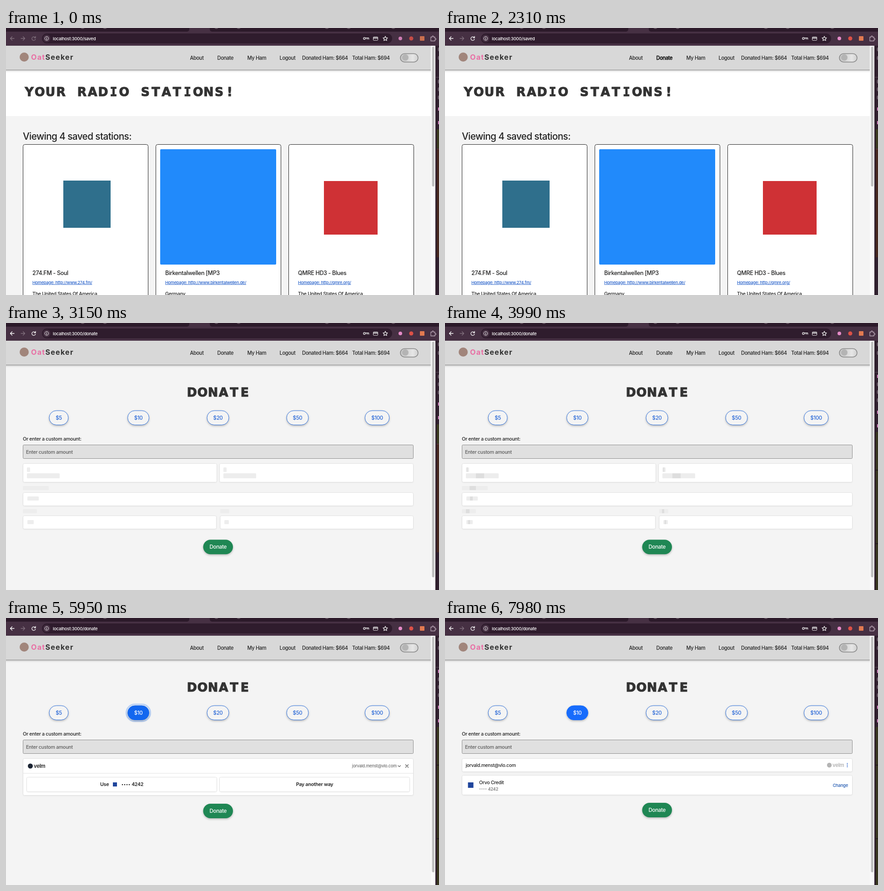
Write an HTML page that moves like this. It is 952x588 px and loops after 8 s.

```html
<!DOCTYPE html>
<html lang="en">
<head>
<meta charset="utf-8">
<title>Donate flow</title>
<style>
  html, body { margin: 0; width: 100%; height: 100%; overflow: hidden; background: #f4f4f4 }
  svg { display: block; width: 952px; height: 588px }
  text { font-family: Inter, Roboto, sans-serif; font-weight: 450; letter-spacing: -.03em; fill: #222; white-space: pre }
  .heading { font: 700 26.5px "DejaVu Sans", sans-serif; text-anchor: middle; fill: #333; stroke: #333; stroke-width: 1.2; letter-spacing: 0 }
  .slab { font-family: "DejaVu Sans Mono", monospace }
  .brand { font-weight: 700; letter-spacing: 1.2px; fill: #333 }
  .mid { text-anchor: middle }
  .end { text-anchor: end }
  .line { fill: none; stroke-width: 1.3; stroke-linecap: round; stroke-linejoin: round }
  .lift { filter: drop-shadow(0 2px 2px rgba(0, 0, 0, .25)) }
  .soft { filter: drop-shadow(0 1px 1px rgba(0, 0, 0, .06)) }
</style>
</head>
<body>
<svg id="stage" viewBox="0 0 952 588"></svg>
<script>
const text = (x, y, size, str, attrs = '') => `<text x="${x}" y="${y}" font-size="${size}" ${attrs}>${str}</text>`;
const rect = (x, y, w, h, fill, rx = 0, attrs = '') =>
  `<rect x="${x}" y="${y}" width="${w}" height="${h}" fill="${fill}" rx="${rx}" ${attrs}/>`;
const dot = (x, y, r, fill, attrs = '') => `<circle cx="${x}" cy="${y}" r="${r}" fill="${fill}" ${attrs}/>`;
const line = (d, color, attrs = '') => `<path class="line" d="${d}" stroke="${color}" ${attrs}/>`;
const group = (id, ...parts) => `<g id="${id}">${parts.join('')}</g>`;
const each = (list, fn) => list.map(fn).join('');
const bold = 'style="font-weight:600"', medium = 'style="font-weight:500"';

// Monospaced wide heading: one fixed pitch per letter, slab-serif I
const heading = (x, y, str) =>
  `<text class="heading" x="${[...str].map((_, i) => (x + i * 23.2).toFixed(1)).join(' ')}" y="${y}">` +
  str.replace(/I/g, '<tspan class="slab">I</tspan>') + '</text>';

const toolbar = () => rect(0, 0, 952, 39, '#463043') +
  rect(-8, -8, 411, 16, '#2c1a2a', 5) + rect(448, -8, 520, 16, '#2c1a2a', 5) +
  each([168, 217, 462, 511, 705, 753, 851], x => line(`M${x - 3} 0l2 1h3l2 -1`, '#85757f', 'opacity=".8"')) +
  line('M18 23H9.500m4 -4l-4 4l4 4', '#fff', 'id="back"') +
  line('M33 23h8.500m-4 -4l4 4l-4 4', '#81707d') +
  line('M64.500 21.500a4 4 0 1 0 .3 2.800M65 18.500v3.200h-3.200', '#fff', 'id="reload"') +
  rect(79, 12, 770, 22, '#2f1c2d', 11) + dot(89.5, 23, 8, '#463043') +
  dot(89.5, 23, 4.2, 'none', 'stroke="#eee"') + line('M89.500 22.800v2.300M89.500 20.800v.1', '#eee') +
  text(103, 27, 9.6, '', 'id="url" style="fill:#fff"') +
  dot(788, 23, 2.2, 'none', 'stroke="#eee" stroke-width="1.300"') + line('M790.500 22h7v3M794 22v3', '#eee') +
  rect(807.5, 19.5, 10, 7.5, 'none', 1, 'stroke="#eee"') + rect(807.5, 21, 10, 2, '#eee') +
  line('M834 18.200l1.500 3.200l3.500 .4l-2.600 2.400l.7 3.500l-3.100 -1.800l-3.100 1.800l.7 -3.500l-2.600 -2.400l3.500 -.4z', '#eee', 'stroke-width="1.100"') +
  group('extensions', dot(867, 23, 4, '#e58bc8'), dot(891, 23, 4.5, '#dd5147'), rect(910, 18, 10, 10, '#e27a50', 1)) +
  line('M934 20h3v-1a1.500 1.500 0 0 1 3 0v1h3v3h1a1.500 1.500 0 0 1 0 3h-1v2.500h-9z', '#b9a6b5');

const sidebar = (id, marks, pinks, bands) => group(id, rect(944, 39, 8, 549, '#30202e'),
  each(bands, ([y, h, c]) => rect(947, y, 5, h, c)),
  rect(945, 108, 7, 1, '#5a4856'),
  each(marks, y => rect(950.5, y - 3.5, 6, 7, 'none', 1, 'stroke="#a99aa6"')),
  each(pinks, y => rect(950, y - 3, 2, 7, '#d884c4')));

const navbar = () => rect(0, 93, 934, 5, 'url(#shade)') + rect(0, 39, 934, 54, '#d8d8d8') + rect(0, 92, 934, 1, '#858585') +
  dot(40, 64, 10, '#a1857b') +
  text(55, 69.5, 16.2, '<tspan fill="#e870a4">Oat</tspan>Seeker', 'class="brand"') +
  each([[404.5, 'About'], [464.5, 'Donate', 'id="navDonate"'], [530.5, 'My Ham'], [601.5, 'Logout'],
    [651, 'Donated Ham: $664'], [761, 'Total Ham: $694']], ([x, s, a]) => text(x, 69.7, 11.05, s, a)) +
  rect(867, 56.5, 39, 18.5, 'url(#toggle)', 9.2, 'stroke="#858585" stroke-width="1.500"') + dot(878, 65, 7, '#b4b4b4');

const card = (x, logo, title, url, country) =>
  rect(x + .5, 256.5, 275, 340, '#fff', 4, 'stroke="#222"') + logo +
  text(x + 21, 544, 12.6, title, medium) +
  text(x + 21, 563.5, 9.2, 'Homepage: ' + url, 'text-decoration="underline" style="fill:#245fc9"') +
  text(x + 21, 589, 10.7, country);

const saved = () => group('saved', rect(0, 93, 934, 101, '#fff'),
  heading(51, 149.6, 'YOUR RADIO STATIONS!'),
  text(37, 246, 20.8, 'Viewing 4 saved stations:', medium),
  card(37, rect(126, 336, 104, 104, '#2f6f8c'), '274.FM - Soul', 'http://www.274.fm/', 'The United States Of America'),
  card(329, rect(339, 267, 255, 254, '#218afb', 2), 'Birkentalwellen [MP3', 'http://www.birkentalwellen.de/', 'Germany'),
  card(621, rect(699, 337, 118, 118, '#cf3135'), 'QMRE HD3 - Blues', 'http://qmre.org/', 'The United States Of America'));

const amount = (x, w, label, id = '') =>
  rect(x - w / 2, 193, w, 31.5, '#f4f4f4', 15.75, `class="lift" stroke="#2d70dc" id="${id && id + 'Pill'}"`) +
  text(x, 213, 11.5, label, `class="mid" style="fill:#2565d6" id="${id && id + 'Label'}"`);

const form = () => group('form',
  rect(264.5, 190, 53, 37.5, 'none', 18.7, 'id="ring" stroke="#0d6efd" stroke-opacity=".25" stroke-width="3"'),
  amount(116, 42, '$5'), amount(291, 47, '$10', 'ten'), amount(466, 48, '$20'), amount(641, 48, '$50'), amount(816, 53.5, '$100'),
  text(37, 259, 10.75, 'Or enter a custom amount:'),
  rect(37.5, 268.5, 858, 30, '#e0e0e0', 2, 'stroke="#8d8d8d"'),
  text(44, 287.5, 10.7, 'Enter custom amount', 'style="fill:#5c5c5c"'),
  group('spinner', rect(879, 276, 10, 15, '#f1f1f1', 2),
    '<path d="M881.500 281.500l2.500 -3l2.500 3zM881.500 286l2.500 3l2.500 -3z" fill="#333"/>'));

const panel = (x, y, w, h, attrs = '') => rect(x + .5, y + .5, w - 1, h - 1, '#fff', 3, `class="soft" stroke="#e2e2e2" ${attrs}`);
const bone = (x, y, w, h) => rect(x, y, w, h, 'url(#shimmer)', 1.5);

const skeleton = () => group('skeleton', panel(37, 309, 427, 42), panel(469, 309, 427, 42),
  panel(37, 373, 859, 30), panel(37, 424, 426, 30), panel(470.5, 424, 425.5, 30),
  each([46, 478], x => bone(x, 318, 7, 10) + bone(x, 331, 72, 11)),
  bone(37, 359, 57, 9), bone(47, 382, 25, 9), bone(37, 410, 31, 9), bone(47, 434, 14, 9),
  bone(471, 410, 20, 9), bone(480, 434, 10, 9));

const email = 'jorvald.menst@vlo.com';
const wallet = () => group('wallet', panel(37, 309, 859, 82), rect(37, 341.5, 859, 1, '#e2e2e2'),
  dot(53.5, 326, 5.5, '#1b2433'), text(61, 330, 11.5, 'velm', bold),
  text(859, 329, 9.2, email, 'class="end" style="fill:#6c6c6c"'),
  line('M862 325l2.700 2.500l2.700 -2.500', '#666'), line('M878.500 323l6 6m0 -6l-6 6', '#555'),
  panel(45, 350, 419, 33, 'id="useCard"'), panel(469, 350, 419, 33),
  text(207, 370, 10.8, 'Use', bold), rect(235, 362, 9, 9, '#1f459c'),
  each([256, 261, 266, 271], x => dot(x, 367, 1.3, '#222')), text(302, 370, 10.6, '4242', bold + ' class="end"'),
  text(678.5, 370, 10.8, 'Pay another way', bold + ' class="mid"'));

const chosen = () => group('chosen', panel(37, 309, 859, 30), panel(37, 346, 859, 44),
  text(45.5, 327.7, 10.3, email), dot(845, 324, 5.2, '#b4b4b4'),
  text(852, 328, 11.5, 'velm', 'style="font-weight:600;fill:#b4b4b4"'),
  each([320.5, 324, 327.5], y => dot(884.5, y, 1.1, '#245fc9')),
  rect(50.5, 362, 12, 12, '#1f459c'), text(75, 366.3, 10.5, 'Orvo Credit', medium),
  each([77, 81.3, 85.6, 89.9], x => dot(x, 376.5, 1, '#777')), text(117, 379.7, 9.4, '4242', 'class="end" style="fill:#6c6c6c"'),
  text(886, 371.5, 9.5, 'Change', 'class="end" style="font-weight:500;fill:#2058b0"'));

stage.innerHTML = `<defs>
  <linearGradient id="shade" x2="0" y2="1"><stop stop-opacity=".14"/><stop offset="1" stop-opacity="0"/></linearGradient>
  <linearGradient id="toggle"><stop stop-color="#c4c4c4"/><stop offset=".7" stop-color="#e6e6e6"/><stop offset="1" stop-color="#d0d0d0"/></linearGradient>
  <linearGradient id="shimmer"><stop offset=".3" stop-color="#ededed"/><stop offset=".3" stop-color="#dedede"/>
    <stop offset=".55" stop-color="#dedede"/><stop offset=".55" stop-color="#ededed"/></linearGradient></defs>` +
  rect(0, 0, 952, 588, '#f4f4f4') + saved() +
  group('donate', heading(408.7, 162.4, 'DONATE'), form(), skeleton(), wallet(), chosen(),
    group('submit', rect(433.5, -16, 65.5, 32, '#1f8754', 16, 'class="lift"'),
      text(466.2, 4.2, 11.6, 'Donate', 'class="mid" style="font-weight:500;fill:#fff"'))) +
  navbar() + rect(934, 39, 10, 549, '#fafafa') + rect(936.5, 41, 5.5, 308, '#c1c1c1', 2.7, 'id="thumb"') +
  sidebar('sideBefore', [47, 66, 118, 135, 153], [178, 208], [[223, 42, '#3a391f'], [266, 1, '#6b4a3a'], [267, 238, '#46271f']]) +
  sidebar('sideAfter', [47, 66, 135, 152, 170], [117, 196, 226], [[240, 348, '#37351f'], [323, 2, '#241a1c'], [485, 2, '#241a1c']]) +
  toolbar();

const el = id => document.getElementById(id);
const ramp = (t, from, to) => Math.min(1, Math.max(0, (t - from) / (to - from)));
const mix = (a, b, k) => `rgb(${a.map((v, i) => Math.round(v + (b[i] - v) * k))})`;
const opacity = (id, value) => {
  el(id).style.opacity = value;
  el(id).style.display = value > 0 ? '' : 'none';
};

function draw(t) {
  const donating = t >= 2590;
  opacity('saved', +!donating);
  opacity('donate', +donating);
  el('thumb').setAttribute('height', donating ? 519 : 308);
  el('url').textContent = 'localhost:3000/' + (t < 2660 ? 'saved' : 'donate');
  for (const id of ['back', 'reload']) el(id).style.stroke = t < 1750 ? '#81707d' : '#fff';
  opacity('extensions', t < 280 ? .85 : 1);
  opacity('sideBefore', +(t < 3570));
  opacity('sideAfter', +(t >= 3570));

  const hover = ramp(t, 1890, 2170) - ramp(t, 2730, 3010);
  el('navDonate').style.fill = mix([34, 34, 34], [0, 0, 0], hover);
  el('navDonate').style.stroke = `rgba(0,0,0,${hover})`;
  el('navDonate').style.strokeWidth = .3;

  opacity('form', +(t >= 2730));
  opacity('spinner', +(t >= 4970 && t < 5040));
  opacity('skeleton', t < 3150 ? 0 : 1 - ramp(t, 4060, 4270));
  el('shimmer').setAttribute('gradientTransform', `translate(${(t - 3990) / 1500})`);
  opacity('wallet', ramp(t, 4130, 4480) * (1 - ramp(t, 7630, 7840)));
  opacity('chosen', ramp(t, 7700, 7980));
  el('useCard').style.fill = mix([255, 255, 255], [244, 244, 244], ramp(t, 6860, 7000));

  opacity('submit', +(t >= 2730));
  const y = t < 3150 ? 341 : t < 4200 ? 493.2 : t < 7840 ? 425 : 423;
  el('submit').setAttribute('transform', `translate(0 ${y})`);

  const filled = ramp(t, 5250, 5460);
  const pressed = ramp(t, 5880, 6090) - ramp(t, 6510, 6790);
  const blue = [23 - 12 * pressed, 108 - 14 * pressed, 252 - 37 * pressed];
  el('tenPill').style.fill = mix([244, 244, 244], blue, filled);
  el('tenPill').style.stroke = mix([45, 112, 220], blue, filled);
  el('tenLabel').style.fill = mix([37, 101, 214], [255, 255, 255], filled);
  el('tenLabel').style.fontWeight = filled > .5 ? 500 : 450;
  opacity('ring', ramp(t, 5810, 5950) - ramp(t, 5950, 6090));
}

function tick() {
  draw(performance.now() % 8000);
  requestAnimationFrame(tick);
}
tick();
</script>
</body>
</html>
```
